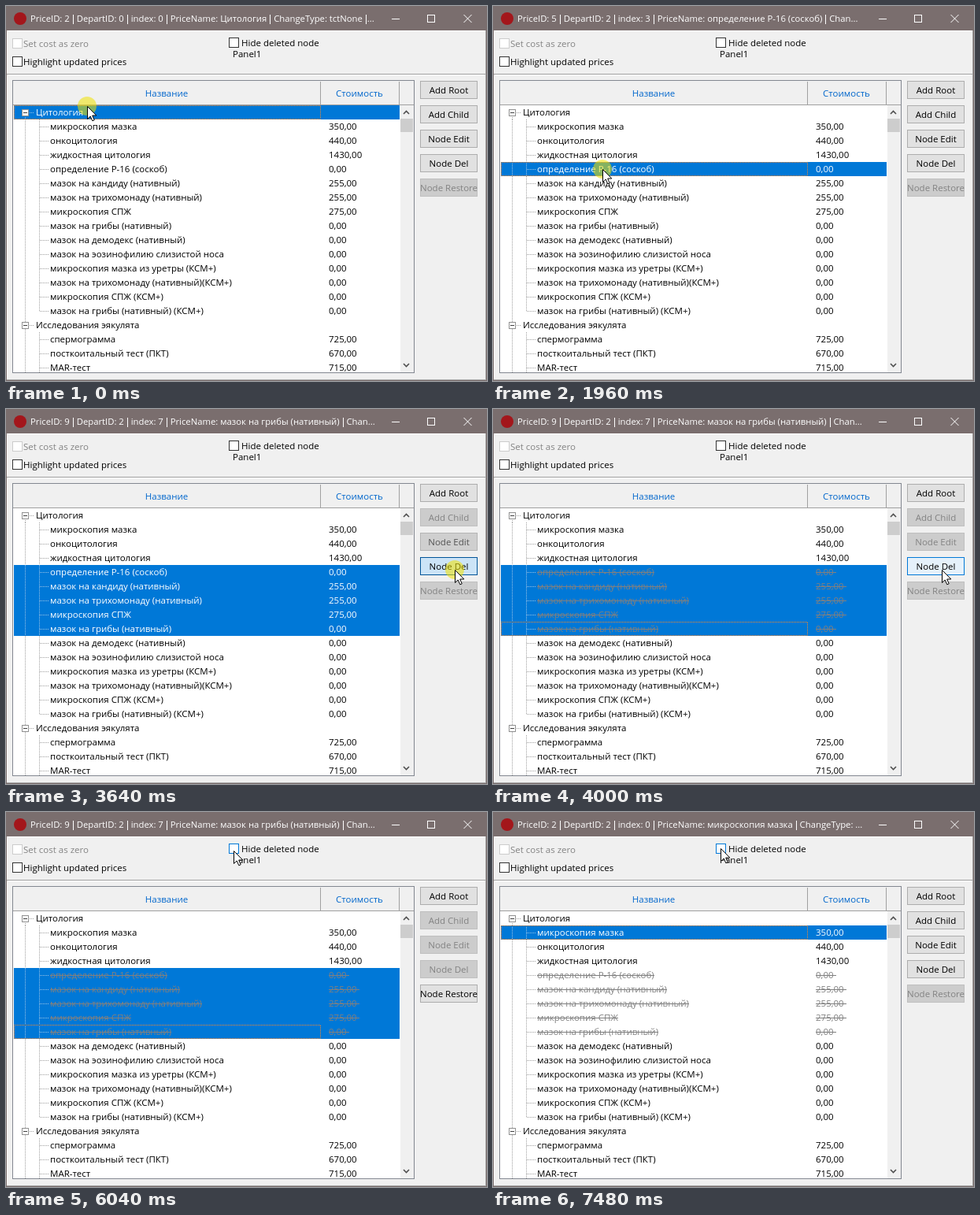
Write an HTML page with a canvas that moves like this. It is 611x476 px and loops after 8 s.

```html
<!DOCTYPE html>
<html lang="ru">
<head>
<meta charset="utf-8">
<title>Price tree</title>
<style>
html, body { margin: 0; width: 100%; height: 100%; overflow: hidden; background: #f0f0f0; }
canvas { display: block; }
</style>
</head>
<body>
<canvas id="stage" width="611" height="476"></canvas>
<script>
const g = document.getElementById('stage').getContext('2d');
const LOOP = 8000, ROW = 18, TOP = 126, BLUE = '#0078d7', SHADE = '#a0a0a0';

// A name without a price is a root node.
const nodes = `Цитология
микроскопия мазка=350
онкоцитология=440
жидкостная цитология=1430
определение Р-16 (соскоб)=0
мазок на кандиду (нативный)=255
мазок на трихомонаду (нативный)=255
микроскопия СПЖ=275
мазок на грибы (нативный)=0
мазок на демодекс (нативный)=0
мазок на эозинофилию слизистой носа=0
микроскопия мазка из уретры (КСМ+)=0
мазок на трихомонаду (нативный)(КСМ+)=0
микроскопия СПЖ (КСМ+)=0
мазок на грибы (нативный) (КСМ+)=0
Исследования эякулята
спермограмма=725
посткоитальный тест (ПКТ)=670
MAR-тест=715
тест Дорвена=935
жизнеспособность спермиев=570
определение фруктозы в сперме=0
определение а-гликозидазы=0
исследование посторгазменной мочи=360`.split('\n').map((line, id) => {
  const [name, price] = line.split('=');
  return { id, name, price };
});

// Start time, first and last selected row, window caption.
const selections = [
  [0, 0, 0, 'PriceID: 2 | DepartID: 0 | index: 0 | PriceName: Цитология | ChangeType: tctNone |...'],
  [1040, 1, 1, 'PriceID: 2 | DepartID: 2 | index: 0 | PriceName: микроскопия мазка | ChangeType: ...'],
  [1920, 4, 4, 'PriceID: 5 | DepartID: 2 | index: 3 | PriceName: определение Р-16 (соскоб) | Chan...'],
  [2640, 4, 8, 'PriceID: 9 | DepartID: 2 | index: 7 | PriceName: мазок на грибы (нативный) | Chan...'],
  [6240, 1, 1, 'PriceID: 2 | DepartID: 2 | index: 0 | PriceName: микроскопия мазка | ChangeType: ...']
];

// Pointer stops: time, x, y.
const path = [
  [0, 103, 127], [80, 103, 127], [400, 106, 122], [600, 106, 122], [840, 140, 161],
  [1120, 140, 161], [1500, 141, 259], [1840, 139, 207], [2000, 139, 207], [2480, 138, 279],
  [2720, 138, 279], [2860, 170, 319], [3320, 591, 215], [3440, 570, 204],
  [4480, 570, 204], [5000, 122, 334], [5120, 122, 334], [5160, 130, 331], [5440, 278, 91],
  [5560, 278, 91], [5900, 289, 49], [6720, 289, 49], [6840, 289, 46], [LOOP, 289, 46]
];
const presses = [[0, 80], [1040, 1120], [1920, 2000], [2640, 2720], [3480, 4000], [6080, 6240], [7200, 7400]];

const within = (t, a, b) => t >= a && t < b;
const ramp = (t, from, to) => Math.min(1, Math.max(0, (t - from) / (to - from)));

function box(x, y, w, h, fill, border) {
  g.fillStyle = border || fill;
  g.fillRect(x, y, w, h);
  if (border) {
    g.fillStyle = fill;
    g.fillRect(x + 1, y + 1, w - 2, h - 2);
  }
}

function text(s, x, middle, color = '#000', align = 'left', size = 11.5) {
  g.font = size + 'px "Open Sans", "Noto Sans", sans-serif';
  g.textAlign = align;
  g.fillStyle = color;
  g.fillText(s, x, middle + 4);
}

function line(color, points, dash = [], width = 1) {
  g.strokeStyle = color;
  g.lineWidth = width;
  g.setLineDash(dash);
  g.beginPath();
  points.forEach(([x, y]) => g.lineTo(x, y));
  g.stroke();
  g.setLineDash([]);
}

function faded(alpha, draw) {
  if (alpha <= 0) return;
  g.globalAlpha = alpha;
  draw();
  g.globalAlpha = 1;
}

function raisedPanel(x, y, w, h) {
  box(x, y, w, h, SHADE);
  box(x, y, w - 1, h - 1, '#f0f0f0', '#fff');
  box(x + 1, y + 1, w - 2, h - 2, '#f0f0f0');
}

function titleBar(caption) {
  g.fillStyle = '#a3161b';
  g.beginPath();
  g.arc(18, 16, 8, 0, 7);
  g.fill();
  let x = 31;
  caption.split('|').forEach((part, i) => {
    if (i) {
      box(Math.round(x) + 1, 11, 1, 12, '#fff');
      x += 3;
    }
    text(part, x, 16, '#fff', 'left', 11.3);
    x += g.measureText(part).width;
  });
  line('#fff', [[490, 16.5], [500, 16.5]]);
  g.strokeRect(535.5, 11.5, 9, 9);
  line('#fff', [[581.5, 11], [591.5, 21]]);
  line('#fff', [[591.5, 11], [581.5, 21]]);
}

function checkBox(x, middle, label, gap, color = '#000', border = '#333', fill = '#fff') {
  box(x, middle - 7, 13, 13, fill, border);
  text(label, x + 13 + gap, middle, color);
}

function optionPanel(t) {
  text('Panel1', 288, 61);
  checkBox(8, 48, 'Set cost as zero', 1, '#838383', '#ccc');
  checkBox(8, 71, 'Highlight updated prices', 1);
  const hot = t >= 5840, down = within(t, 6080, 6280) || within(t, 7200, 7400);
  checkBox(283, 47, 'Hide deleted node', 3, '#000',
    down ? '#005499' : hot ? BLUE : '#333', down ? '#cce4f7' : '#fff');
  if (t < 7400) {
    faded(ramp(t, 6240, 6400), () => line(BLUE, [[286, 46], [288.5, 49], [293, 43]], [], 1.5));
  }
}

function button(i, label, enabled, hot = 0, down = false) {
  const y = 95 + 31 * i;
  const face = (fill, border, color) => {
    box(526, y, 73, 23, fill, border);
    text(label, 562.5, y + 12, color, 'center');
  };
  face('#ccc', '#bfbfbf', '#838383');
  faded(enabled, () => face('#e1e1e1', '#adadad', '#000'));
  faded(hot, () => down ? face('#cce4f7', '#005499', '#000') : face('#e5f1fb', BLUE, '#000'));
}

function buttons(t) {
  const back = ramp(t, 6360, 6600), off = ramp(t, 4000, 4360);
  button(0, 'Add Root', 1);
  button(1, 'Add Child', t < 2640 ? 1 : back);
  button(2, 'Node Edit', 1 - ramp(t, 3480, 3840) + back);
  button(3, 'Node Del', 1 - off + back, ramp(t, 3280, 3440) * (1 - off), within(t, 3480, 4000));
  button(4, 'Node Restore', off * (1 - ramp(t, 6240, 6400)));
}

function struckText(s, x, y, color, extra) {
  text(s, x, y, color);
  box(x, y, Math.round(g.measureText(s).width) + extra, 1, color);
}

function row(node, y, selected, deleted, last) {
  const mid = y + 9, root = !node.price, x = root ? 38 : 56, dots = selected ? '#9cc3e6' : SHADE;
  if (selected) box(10, y, 490, ROW, BLUE);
  line(dots, [[24.5, node.id ? y : mid], [24.5, y + ROW]], [1, 1]);
  if (root) {
    line(dots, [[30, mid + .5], [36, mid + .5]], [1, 1]);
    box(20, mid - 4, 9, 9, '#fff', '#919191');
    box(22, mid, 5, 1, '#404040');
  } else {
    line(dots, [[42.5, y], [42.5, last ? mid : y + ROW]], [1, 1]);
    line(dots, [[43, mid + .5], [54, mid + .5]], [1, 1]);
  }
  const price = node.price + ',00';
  if (deleted) {
    struckText(node.name, x, mid, '#808080', 0);
    struckText(price, 410, mid, '#808080', 3);
  } else {
    const color = selected ? '#fff' : '#000';
    text(node.name, x, mid, color);
    if (!root) text(price, 410, mid, color);
  }
}

function scrollBar() {
  box(501, TOP, 17, 339, '#f0f0f0');
  box(501, 143, 16, 17, '#cdcdcd');
  line('#505050', [[505, 137], [508.5, 133.5], [512, 137]], [], 1.6);
  line('#505050', [[505, 454], [508.5, 457.5], [512, 454]], [], 1.6);
}

function header() {
  box(9, 95, 509, 31, '#f0f0f0');
  box(9, 125, 509, 1, SHADE);
  box(399, 96, 1, 29, SHADE);
  box(499, 96, 1, 29, SHADE);
  text('Название', 204, 111, '#0066cc', 'center');
  text('Стоимость', 449, 111, '#0066cc', 'center');
}

function tree(t, first, last) {
  box(8, 94, 511, 372, '#fff', '#828790');
  header();
  const isDeleted = id => t >= 4000 && id >= 4 && id <= 8;
  const hidden = within(t, 6240, 7400);
  const shown = nodes.filter(n => !(hidden && isDeleted(n.id))).slice(0, 19);
  g.save();
  g.beginPath();
  g.rect(9, TOP, 509, 339);
  g.clip();
  shown.forEach((n, i) => {
    const selected = n.id >= first && n.id <= last;
    row(n, TOP + i * ROW, selected, isDeleted(n.id), shown[i + 1] && !shown[i + 1].price);
  });
  if (!within(t, 3480, 4000)) {
    const y = TOP + last * ROW + .5, b = y + ROW - 1;
    line('#ff8728', [[10, y], [399.5, y], [399.5, b], [10.5, b], [10.5, y]], [1, 1]);
  }
  g.restore();
  scrollBar();
}

function pointer(t) {
  const i = path.findIndex(p => p[0] > t);
  const [t0, x0, y0] = path[i - 1], [t1, x1, y1] = path[i];
  const k = ramp(t, t0, t1), e = k * k * (3 - 2 * k);
  const x = Math.round(x0 + (x1 - x0) * e), y = Math.round(y0 + (y1 - y0) * e);
  if (presses.some(([a, b]) => within(t, a, b))) {
    g.fillStyle = 'rgba(240,226,0,.55)';
    g.beginPath();
    g.arc(x, y, 12, 0, 7);
    g.fill();
  }
  g.save();
  g.translate(x + .5, y + .5);
  const arrow = new Path2D('M0 0V16L3.7 12.5L6.3 18.3L8.7 17.3L6.2 11.5H11.3Z');
  g.fillStyle = '#fff';
  g.fill(arrow);
  g.strokeStyle = '#000';
  g.lineWidth = 1;
  g.stroke(arrow);
  g.restore();
}

function draw(now) {
  const t = Math.floor(now % LOOP / 40) * 40;
  const [, first, last, caption] = selections.filter(s => s[0] <= t).pop();
  box(0, 0, 611, 476, '#7a6e6e');
  titleBar(caption);
  raisedPanel(1, 31, 609, 56);
  raisedPanel(1, 87, 609, 388);
  optionPanel(t);
  tree(t, first, last);
  buttons(t);
  pointer(t);
}

let start;
function frame(now) {
  start ??= now;
  draw(now - start);
  requestAnimationFrame(frame);
}
draw(0);
requestAnimationFrame(frame);
</script>
</body>
</html>
```
